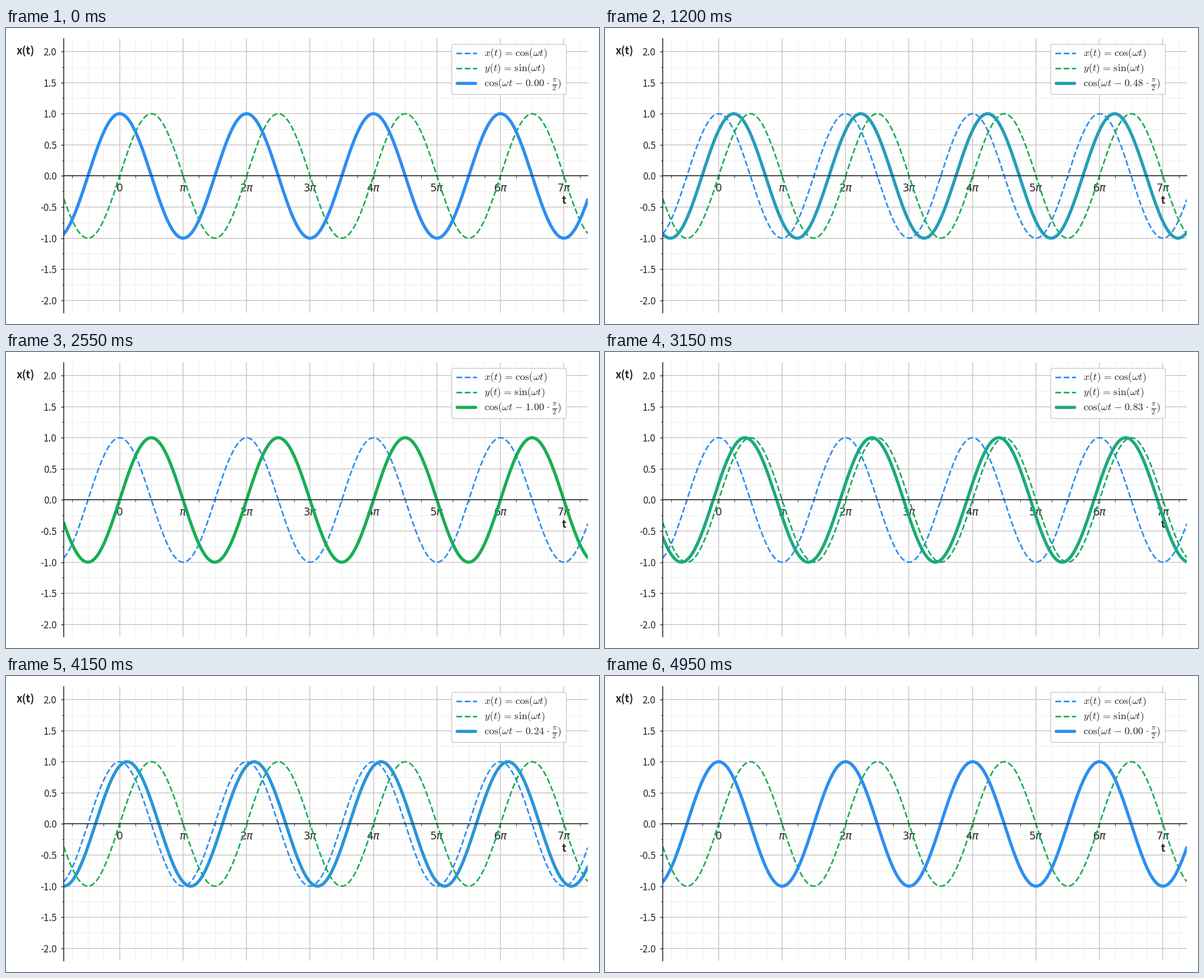
These frames come from a looping animation (1058x529 px, 5 s). A matplotlib script:

```python
import numpy as np
import matplotlib.pyplot as plt
from matplotlib.animation import FuncAnimation
from matplotlib.patches import FancyBboxPatch
from matplotlib.ticker import MultipleLocator

W, H, DPI = 1058, 529, 100
FRAMES, INTERVAL = 100, 50
PI = np.pi
BLUE = np.array([45, 142, 242]) / 255
GREEN = np.array([25, 174, 84]) / 255
INK = "#262626"
LEFT, RIGHT, TOP, BOTTOM = 103, 1038, 19.4, 509.4
X0, STEP = 202.8, 113.23

plt.rcParams.update({
    "font.family": "Noto Sans CJK JP",
    "mathtext.fontset": "cm",
    "axes.unicode_minus": False,
    "text.color": INK,
})


def pt(px):
    return px * 72 / DPI


fig = plt.figure(figsize=(W / DPI, H / DPI), dpi=DPI, facecolor="white")
ax = fig.add_axes([LEFT / W, 1 - BOTTOM / H, (RIGHT - LEFT) / W, (BOTTOM - TOP) / H])
t = np.linspace((LEFT - X0) / STEP * PI, (RIGHT - X0) / STEP * PI, 1200)
ax.set_xlim(t[0], t[-1])
ax.set_ylim(-2.203, 2.203)

for side in ("top", "right"):
    ax.spines[side].set_visible(False)
for side in ("left", "bottom"):
    ax.spines[side].set(color=INK, linewidth=pt(1.6))
ax.spines["bottom"].set_position(("data", 0))

ax.xaxis.set_major_locator(MultipleLocator(PI))
ax.xaxis.set_minor_locator(MultipleLocator(PI / 4))
ax.yaxis.set_major_locator(MultipleLocator(0.5))
ax.yaxis.set_minor_locator(MultipleLocator(0.25))
ax.yaxis.set_major_formatter("{x:.1f}")
ax.xaxis.set_major_formatter(lambda x, _: "")
ax.tick_params(which="major", length=pt(5.5), width=pt(1.4), color=INK, labelcolor=INK)
ax.tick_params(which="minor", length=pt(3.5), width=pt(1), color=INK)
ax.tick_params(axis="y", labelsize=pt(17), pad=pt(7))
ax.grid(which="major", color="#c6c6c6", linewidth=pt(1.5))
ax.grid(which="minor", color="#ececec", linewidth=pt(1))

# Axis labels sit under the curves
canvas = fig.add_axes([0, 0, 1, 1], zorder=5)
canvas.set(xlim=(0, W), ylim=(H, 0))
canvas.axis("off")
for k in range(8):
    label = "0" if k == 0 else rf"${k if k > 1 else ''}\pi$"
    ax.annotate(label, (k * PI, 0), xytext=(0, -pt(27.5)), textcoords="offset points",
                ha="center", va="baseline", fontsize=pt(18.7), color=INK,
                family="DejaVu Sans", math_fontfamily="dejavusans", zorder=1.6)
ax.annotate("t", (7 * PI, 0), xytext=(0, -pt(50)), textcoords="offset points",
            ha="center", va="baseline", fontsize=pt(18.5), weight="bold",
            color=INK, zorder=1.6)
canvas.text(35, 47, "x(t)", ha="center", va="baseline", fontsize=pt(18.5), weight="bold")

THIN = dict(linestyle="--", linewidth=pt(2.8))
THICK = dict(linewidth=pt(5.6), solid_capstyle="round")
ax.plot(t, np.cos(t), color=BLUE, **THIN)
ax.plot(t, np.sin(t), color=GREEN, **THIN)
wave, = ax.plot(t, np.cos(t), color=BLUE, **THICK)

# Legend
canvas.add_patch(FancyBboxPatch((799, 33), 197, 82, boxstyle="round,pad=3.7",
                                facecolor="white", edgecolor="#cccccc", linewidth=pt(1.5)))


def entry(y, text, color, inset=0, **style):
    key, = canvas.plot([803 + inset, 840 - inset], [y, y], color=color, **style)
    label = canvas.text(853, y + 5.5, text, fontsize=pt(18.4), va="baseline")
    return key, label


def spaced(op, gap=0.1):
    return rf"\hspace{{{gap}}} {op} \hspace{{{gap}}}"


EQ, MINUS, DOT = spaced("="), spaced("-"), spaced(r"\cdot")
entry(45, rf"$x(t) {EQ} \cos(\omega t)$", BLUE, **THIN)
entry(72, rf"$y(t) {EQ} \sin(\omega t)$", GREEN, **THIN)
key, formula = entry(99, "", BLUE, inset=1.8, **THICK)


def update(i):
    a = np.sin(PI * i / (FRAMES - 1)) ** 2
    color = np.sqrt((1 - a) * BLUE ** 2 + a * GREEN ** 2)
    wave.set_ydata(np.cos(t - a * PI / 2))
    wave.set_color(color)
    key.set_color(color)
    formula.set_text(rf"$\cos(\omega t {MINUS} {a:.2f} {DOT} \frac{{\pi}}{{2}})$")
    return wave, key, formula


anim = FuncAnimation(fig, update, frames=FRAMES, interval=INTERVAL, repeat=True,
                     repeat_delay=0, blit=False)
plt.show()
```
